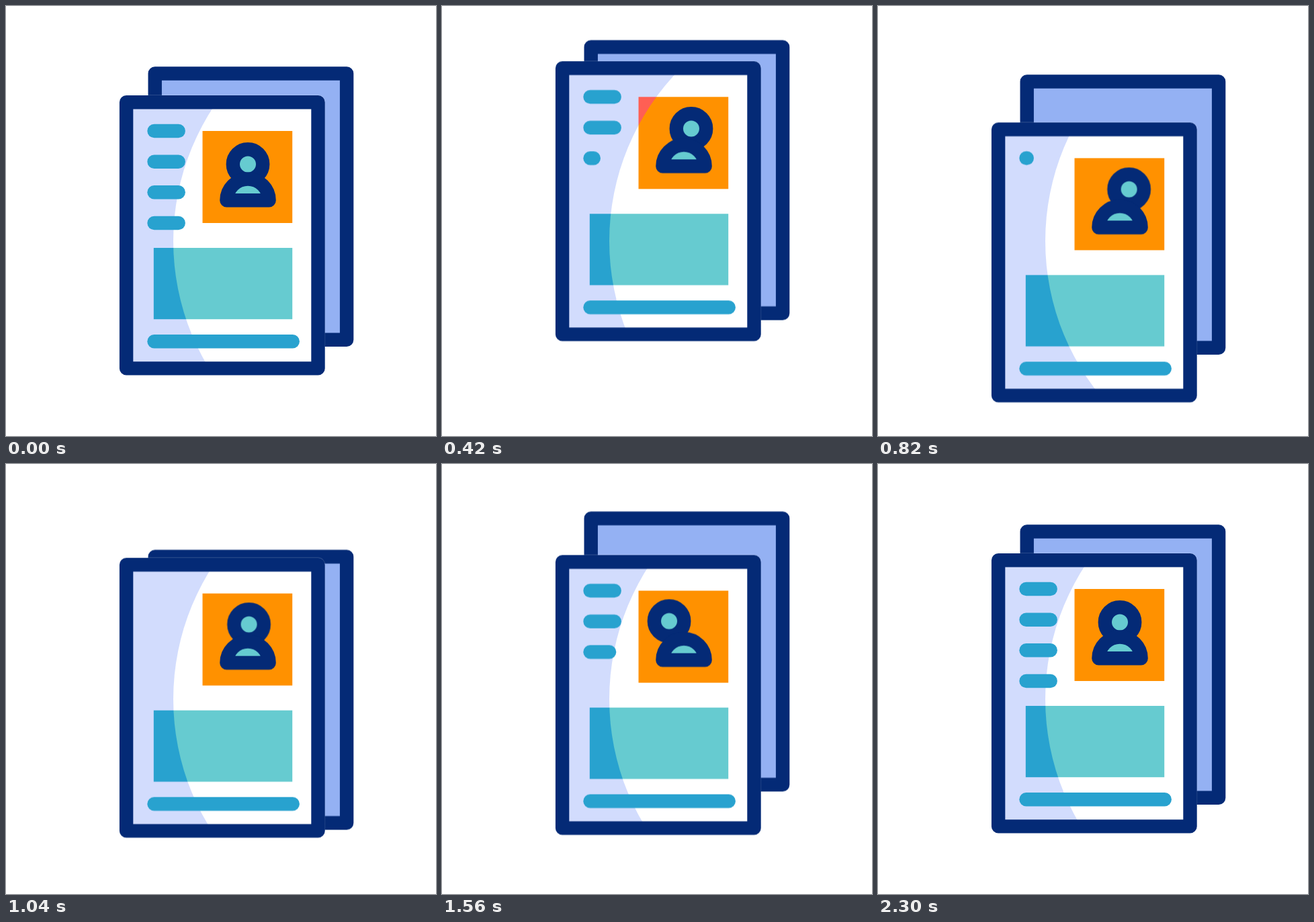
Recreate the animation shown at these times as an HTML page. Size 640x640 px, loop 2400 ms.

```html
<!DOCTYPE html>
<html lang="en">
<head>
<meta charset="utf-8">
<title>Profile pages</title>
<style>
  html, body { margin: 0; width: 100%; height: 100%; overflow: hidden; background: #fff; }
  svg { display: block; width: 100%; height: 100%; }

  .ink { stroke: #042a76; stroke-width: 20.4; stroke-linejoin: round; }
  .line { stroke: #28a2cf; stroke-width: 20.4; stroke-linecap: round; }
  .teal { fill: #66cbd0; }

  .front, .back, .head, .bar {
    animation: 2.4s cubic-bezier(.333, 0, .667, 1) infinite;
  }
  .front { animation-name: front; }
  .back { animation-name: back; }
  .head { animation-name: head; animation-timing-function: cubic-bezier(.65, 0, .35, 1); }
  .b1 { animation-name: b1; }
  .b2 { animation-name: b2; }
  .b3 { animation-name: b3; }
  .b4 { animation-name: b4; }

  @keyframes front {
    0%, 90%, 100% { transform: translateY(0); }
    16.79% { transform: translateY(-51.2px); }
    35.08% { transform: translateY(41px); }
    52.5% { transform: translateY(-32.9px); }
    74.58% { transform: translateY(26px); animation-timing-function: cubic-bezier(.2, 0, .667, 1); }
  }
  @keyframes back {
    0%, 6.25%, 96.04%, 100% { transform: translateY(0); }
    22.63% { transform: translateY(-51.2px); }
    41.13% { transform: translateY(41px); }
    58.13% { transform: translateY(-32.9px); }
    80.54% { transform: translateY(26px); }
  }
  @keyframes head {
    0%, 86.92%, 100% { transform: translate(0, 0); }
    29.17% { transform: translate(14.5px, -3px); }
    61.08% { transform: translate(-22.5px, -4.3px); }
  }

  /* Bars retract from the bottom up, then grow back from the top down. */
  @keyframes b1 {
    0%, 27.25%, 55.46%, 100% { stroke-dasharray: 36.2px 99px; visibility: visible; }
    35.08%, 47.54% { stroke-dasharray: 0px 99px; visibility: hidden; }
  }
  @keyframes b2 {
    0%, 19.42%, 61.42%, 100% { stroke-dasharray: 36.2px 99px; visibility: visible; }
    27.25%, 53.5% { stroke-dasharray: 0px 99px; visibility: hidden; }
  }
  @keyframes b3 {
    0%, 11.58%, 67.38%, 100% { stroke-dasharray: 36.2px 99px; visibility: visible; }
    19.42%, 59.46% { stroke-dasharray: 0px 99px; visibility: hidden; }
  }
  @keyframes b4 {
    0%, 3.75%, 79.58%, 100% { stroke-dasharray: 36.2px 99px; visibility: visible; }
    11.58%, 68.33% { stroke-dasharray: 0px 99px; visibility: hidden; }
  }
</style>
</head>
<body>
<svg viewBox="0 0 640 640" fill="none">
  <defs>
    <clipPath id="light"><circle cx="613" cy="350" r="364"/></clipPath>
    <rect id="sheet" x="179.1" y="143.2" width="285.4" height="396.2"/>
    <rect id="photo" x="292.5" y="186" width="133.7" height="137"/>
    <rect id="panel" x="219.8" y="360" width="206.4" height="106.2"/>
  </defs>

  <rect class="back ink" x="221.7" y="100.5" width="285.4" height="396.2" fill="#94b1f3"/>

  <!-- Shaded page, with the lit copy seen through a fixed circle -->
  <g class="front">
    <use href="#sheet" stroke="#fff" stroke-opacity=".3" stroke-width="21.2" stroke-linejoin="round"/>
    <use href="#sheet" fill="#d2dcfd"/>
    <use href="#photo" fill="#ff5f54"/>
    <use href="#panel" fill="#28a2cf"/>
  </g>
  <g clip-path="url(#light)">
    <g class="front">
      <use href="#sheet" fill="#fff"/>
      <use href="#photo" fill="#ff9100"/>
      <use href="#panel" class="teal"/>
    </g>
  </g>

  <g class="front">
    <use href="#sheet" class="ink"/>
    <path class="bar b1 line" d="M220.5 186h36.2"/>
    <path class="bar b2 line" d="M220.5 231.7h36.2"/>
    <path class="bar b3 line" d="M220.5 277.3h36.2"/>
    <path class="bar b4 line" d="M220.5 323h36.2"/>
    <path class="line" d="M220.5 499.2h206.2"/>
    <circle class="head ink teal" cx="360" cy="235.5" r="22.2"/>
    <path class="ink teal" d="M328.4 289.2a31.6 31.6 0 0 1 63.2 0z"/>
  </g>
</svg>
</body>
</html>
```
